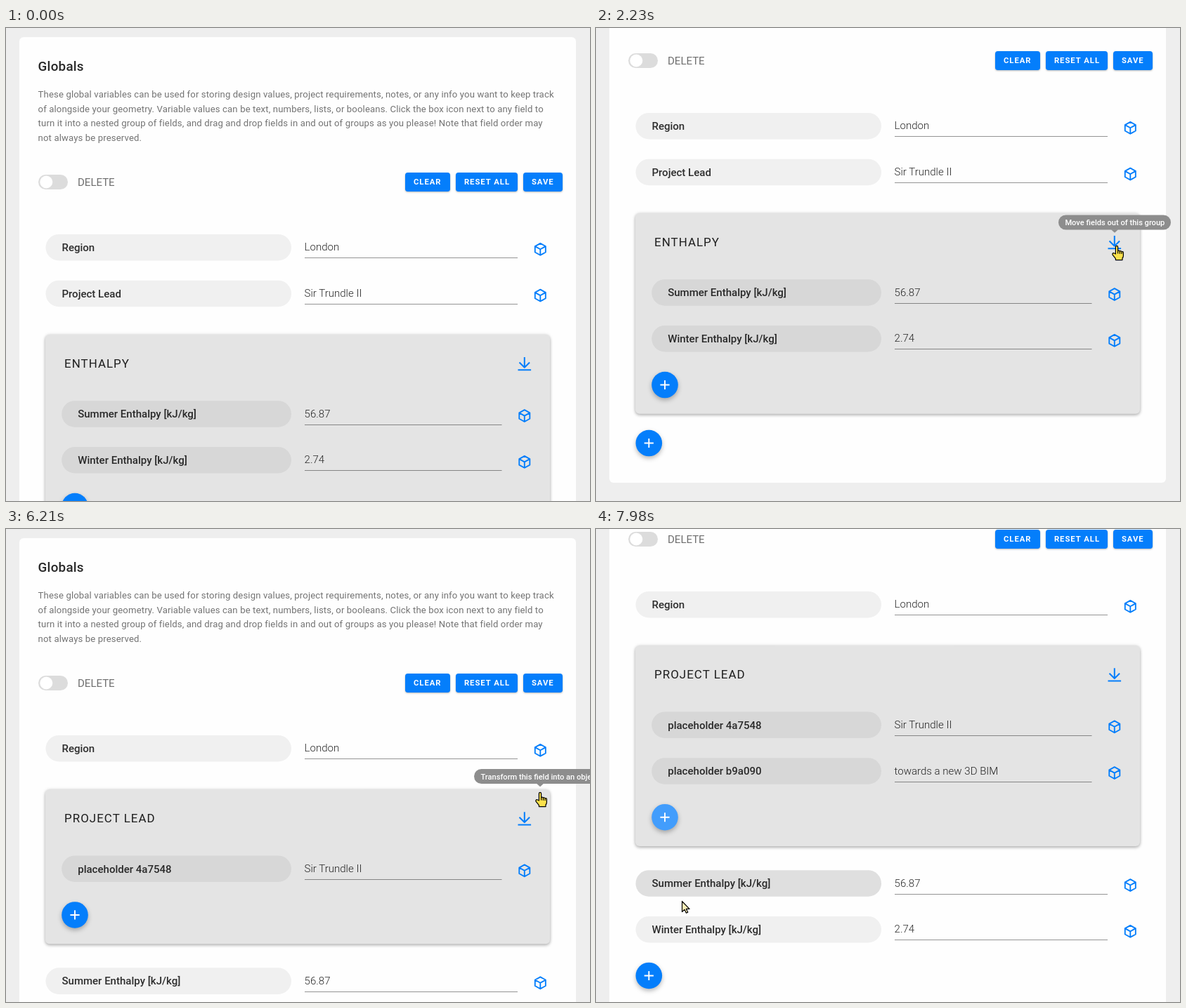
These frames come from a looping animation (831x674 px, 8000 ms). An HTML page:

```html
<!DOCTYPE html>
<html lang="en">
<head>
<meta charset="utf-8">
<title>Globals</title>
<style>
  html, body { margin: 0; width: 100%; height: 100%; overflow: hidden; background: #eee; }
  svg { display: block; font-family: Roboto, "Open Sans", sans-serif; }
  .title { font-size: 18.79px; font-weight: 500; letter-spacing: .0125em; fill: rgba(0,0,0,.84); }
  .para { font-size: 13.15px; letter-spacing: .0093em; fill: rgba(0,0,0,.55); }
  .switch { font-size: 15.03px; fill: rgba(0,0,0,.57); }
  .btn { font-size: 11.27px; font-weight: 700; letter-spacing: .0893em; fill: #fff; }
  .label { font-size: 15.03px; font-weight: 500; fill: rgba(0,0,0,.81); }
  .value { font-size: 15.03px; font-weight: 300; fill: rgba(0,0,0,.84); }
  .group { font-size: 16.9px; font-weight: 400; letter-spacing: 1.05px; fill: rgba(0,0,0,.87); }
  .tip { font-size: 11.1px; font-weight: 500; fill: #fff; }
  .icon { fill: none; stroke: #047efb; stroke-width: 2; stroke-linejoin: round; }
  .raised { filter: drop-shadow(0 1px 1px rgba(0,0,0,.28)); }
  .panel { filter: drop-shadow(0 2px 2px rgba(0,0,0,.24)) drop-shadow(0 0 2px rgba(0,0,0,.14)); }
  .fab { filter: drop-shadow(0 3px 3px rgba(0,0,0,.28)); }
</style>
</head>
<body>
<svg id="stage" width="831" height="674" viewBox="0 0 831 674"></svg>
<script>
const LOOP = 8000;
const BLUE = '#047efb';
const PITCH = 65.77;
const FIRST_ROW = 312.7;

const PARAGRAPH = [
  'These global variables can be used for storing design values, project requirements, notes, or any info you want to keep track',
  'of alongside your geometry. Variable values can be text, numbers, lists, or booleans. Click the box icon next to any field to',
  'turn it into a nested group of fields, and drag and drop fields in and out of groups as you please! Note that field order may',
  'not always be preserved.'
];

const LEAD = 'Sir Trundle II';
const region = ['Region', 'London'];
const lead = ['Project Lead', LEAD];
const summer = ['Summer Enthalpy [kJ/kg]', '56.87'];
const winter = ['Winter Enthalpy [kJ/kg]', '2.74'];
const holder = ['placeholder 4a7548', LEAD];
const added = ['placeholder b9a090', 'towards a new 3D BIM'];

// Each layout holds from its start time on.
const layouts = [
  { from: 0, items: [region, lead, { name: 'ENTHALPY', rows: [summer, winter] }] },
  { from: 3090, items: [region, lead, summer, winter] },
  { from: 6210, items: [region, { name: 'PROJECT LEAD', rows: [holder] }, summer, winter] },
  { from: 7290, items: [region, { name: 'PROJECT LEAD', rows: [holder, added], lit: true }, summer, winter] }
];

// Pointer path: time, x, y
const path = [
  [590, 690, -30], [800, 662, 140], [980, 646, 251], [1480, 646, 251],
  [1640, 430, 330], [1790, 220, 440], [1900, 330, 500], [2060, 620, 390],
  [2230, 741, 311], [3610, 741, 311], [3820, 690, 380], [4240, 650, 562],
  [4380, 650, 562], [4700, 700, 470], [5080, 760, 376], [6470, 760, 376],
  [6740, 634, 248], [6980, 300, 270], [7220, 107, 356], [7380, 107, 356],
  [7620, 110, 420], [7850, 122, 530], [8000, 122, 530]
];

const handTimes = [[2180, 3150], [5010, 6230], [7170, 7330]];

const tips = [
  { text: 'Move fields out of this group', left: 658, width: 160, top: 266.5, stem: 738, from: 2130, to: 3090 },
  { text: 'Transform this field into an object', left: 666, width: 188, top: 342, stem: 760, from: 4980, to: 6210 }
];

const clamp = u => Math.max(0, Math.min(1, u));
const ramp = (t, start, length) => {
  const u = clamp((t - start) / length);
  return u * u * (3 - 2 * u);
};

function add(parent, tag, attrs, text) {
  const node = document.createElementNS('http://www.w3.org/2000/svg', tag);
  for (const key in attrs) node.setAttribute(key, attrs[key]);
  if (text) node.textContent = text;
  parent.append(node);
  return node;
}

const box = (parent, x, y, width, height, rx, fill, cls = '') =>
  add(parent, 'rect', { x, y, width, height, rx, fill, class: cls });

const write = (parent, x, y, cls, text) =>
  add(parent, 'text', { x, y: Math.round(y), class: cls }, text);

const stage = document.getElementById('stage');
const page = add(stage, 'g', {});
let hoverables = [];

function drawHeader() {
  write(page, 45.6, 61, 'title', 'Globals');
  PARAGRAPH.forEach((line, i) => write(page, 45.6, 99 + i * 20.67, 'para', line));

  box(page, 46, 209, 42, 21, 10.5, '#dcdcdc');
  add(page, 'circle', { cx: 57.3, cy: 219.5, r: 9, fill: '#fff' });
  write(page, 102, 225, 'switch', 'DELETE');

  for (const [x, width, text] of [[568, 64, 'CLEAR'], [640, 88, 'RESET ALL'], [736, 56, 'SAVE']]) {
    box(page, x, 206, width, 27, 3.8, BLUE, 'raised');
    write(page, x + 11.9, 223, 'btn', text);
  }
}

function drawRow([label, value], c, nested) {
  const left = nested ? 79.2 : 56.5;
  const right = nested ? 705.5 : 728;
  const pill = box(page, left, c - 18.8, 406 - left, 37.6, 18.8, '#f0f0f0');
  write(page, left + 23, c + 5.3, 'label', label);
  write(page, 424.6, c + 4.6, 'value', value);
  const line = box(page, 425, Math.floor(c + 15.1), right - 425, 1, 0, '#000');
  add(page, 'path', {
    class: 'icon',
    transform: `translate(${right + 32.3} ${c + 2.6}) scale(.94) translate(-12 -12)`,
    d: 'M12 3L20 7.5V16.5L12 21L4 16.5V7.5ZM4 7.5L12 12L20 7.5M12 12V21'
  });
  hoverables.push({ pill, line, c, left, right, shade: nested ? 215 : 240 });
}

function drawFab(x, y, lit) {
  add(page, 'circle', { cx: x, cy: y, r: 18.8, fill: lit ? '#429dfc' : BLUE, class: 'fab' });
  add(page, 'path', {
    d: `M${x - 6.6} ${y}h13.2M${x} ${y - 6.6}v13.2`,
    stroke: '#fff', 'stroke-width': 1.9
  });
}

function drawGroup({ name, rows, lit }, top) {
  const height = 154.2 + rows.length * PITCH;
  box(page, 56, top, 718, height, 6, '#e4e4e4', 'panel');
  write(page, 83, top + 47, 'group', name);
  add(page, 'path', {
    class: 'icon',
    d: `M737.8 ${top + 32}v14.5M730.5 ${top + 39.5}l7.3 7.3l7.3 -7.3M728.5 ${top + 50.2}h18.6`
  });
  rows.forEach((row, i) => drawRow(row, top + 113 + i * PITCH, true));
  drawFab(98, top + 113 + rows.length * PITCH, lit);
  return top + height;
}

function drawLayout({ items }) {
  page.replaceChildren();
  hoverables = [];
  const card = box(page, 19, 13, 792, 0, 6, '#fefefe');
  drawHeader();
  let c = FIRST_ROW;
  let afterGroup = false;
  for (const item of items) {
    afterGroup = !Array.isArray(item);
    if (afterGroup) {
      c = drawGroup(item, c - PITCH + 58.5) + 53;
    } else {
      drawRow(item, c, false);
      c += PITCH;
    }
  }
  if (afterGroup) c -= 11.2;
  drawFab(75.3, c, false);
  card.setAttribute('height', c + 56.4 - 13);
}

function scrollAt(t) {
  if (t < 3090) return Math.round(173 * ramp(t, 700, 450));
  return Math.round(185 * ramp(t, 6680, 450) + 20 * ramp(t, 7900, 80));
}

// Slope at a path point; zero beside a rest.
function slope(i, axis) {
  const a = path[i - 1], b = path[i], c = path[i + 1];
  if (!a || !c || a[axis] === b[axis] || b[axis] === c[axis]) return 0;
  return (c[axis] - a[axis]) / (c[0] - a[0]);
}

function pointerAt(t) {
  if (t < path[0][0]) return path[0].slice(1);
  const i = path.findIndex(p => p[0] > t) - 1;
  const span = path[i + 1][0] - path[i][0];
  const u = (t - path[i][0]) / span;
  return [1, 2].map(axis => {
    const a = path[i][axis], b = path[i + 1][axis];
    const s = u * u * (3 - 2 * u);
    return a + (b - a) * s
      + span * u * (1 - u) * ((1 - u) * slope(i, axis) - u * slope(i + 1, axis));
  });
}

// Share of the last moments the pointer spent on a zone, which gives a soft fade.
function hover(t, x0, x1, y0, y1) {
  let hits = 0;
  for (let k = 0; k < 5; k++) {
    const s = Math.max(0, t - k * 30);
    const [x, y] = pointerAt(s);
    const py = y + scrollAt(s);
    if (x >= x0 && x <= x1 && py >= y0 && py <= y1) hits++;
  }
  return hits / 5;
}

for (const tip of tips) {
  tip.node = add(stage, 'g', {});
  box(tip.node, tip.left, tip.top, tip.width, 21, 10.5, '#8d8d8d');
  add(tip.node, 'path', { d: `M${tip.stem - 5} ${tip.top + 20.8}h10l-5 4.5z`, fill: '#8d8d8d' });
  write(tip.node, tip.left + 9.4, tip.top + 14.5, 'tip', tip.text);
}

const outline = { stroke: '#000', 'stroke-width': 1.2, 'stroke-linejoin': 'round' };
const arrow = add(stage, 'path', {
  ...outline, d: 'M.5 .5V15.5L4 12.3L6.4 17.2L8.7 16.1L6.4 11.4H11Z'
});
const hand = add(stage, 'path', {
  ...outline, fill: '#fbe14c',
  d: 'M-1.6 11V1Q-1.6 -.6 0 -.6T1.6 1V6.4Q3.2 5.4 4.4 7Q6 6 7 7.8Q9.4 7 9.4 9.6V13.5Q9.4 15.4 8 17V19.6H-1.6V17.6L-6 12.2Q-6.6 10.4 -5 9.6Q-3.8 9.4 -1.6 11ZM1.6 6.4V10.5M4.4 7V10.8M7 7.8V11'
});

let shown = null;

function draw(t) {
  const layout = layouts.filter(l => l.from <= t).pop();
  if (layout !== shown) drawLayout(shown = layout);
  page.setAttribute('transform', `translate(0 ${-scrollAt(t)})`);

  for (const { pill, line, c, left, right, shade } of hoverables) {
    const v = Math.round(shade - 17 * hover(t, left, 406, c - 20, c + 28));
    pill.setAttribute('fill', `rgb(${v},${v},${v})`);
    line.setAttribute('fill-opacity', .42 + .45 * hover(t, 425, right, c - 17, c + 48));
  }

  for (const { node, from, to } of tips)
    node.setAttribute('opacity', ramp(t, from, 100) * (1 - ramp(t, to, 60)));

  const [x, y] = pointerAt(t);
  const pointing = handTimes.some(([a, b]) => t >= a && t < b);
  const place = `translate(${Math.round(x)} ${Math.round(y)})`;
  arrow.setAttribute('transform', place);
  hand.setAttribute('transform', place);
  arrow.setAttribute('fill', t > 3090 && t < 6210 ? '#f6e65a' : '#fbeeb8');
  arrow.setAttribute('visibility', pointing || t < path[0][0] ? 'hidden' : 'visible');
  hand.setAttribute('visibility', pointing ? 'visible' : 'hidden');
}

const start = performance.now();
function tick() {
  draw(Math.max(0, performance.now() - start) % LOOP);
  requestAnimationFrame(tick);
}
tick();
</script>
</body>
</html>
```
